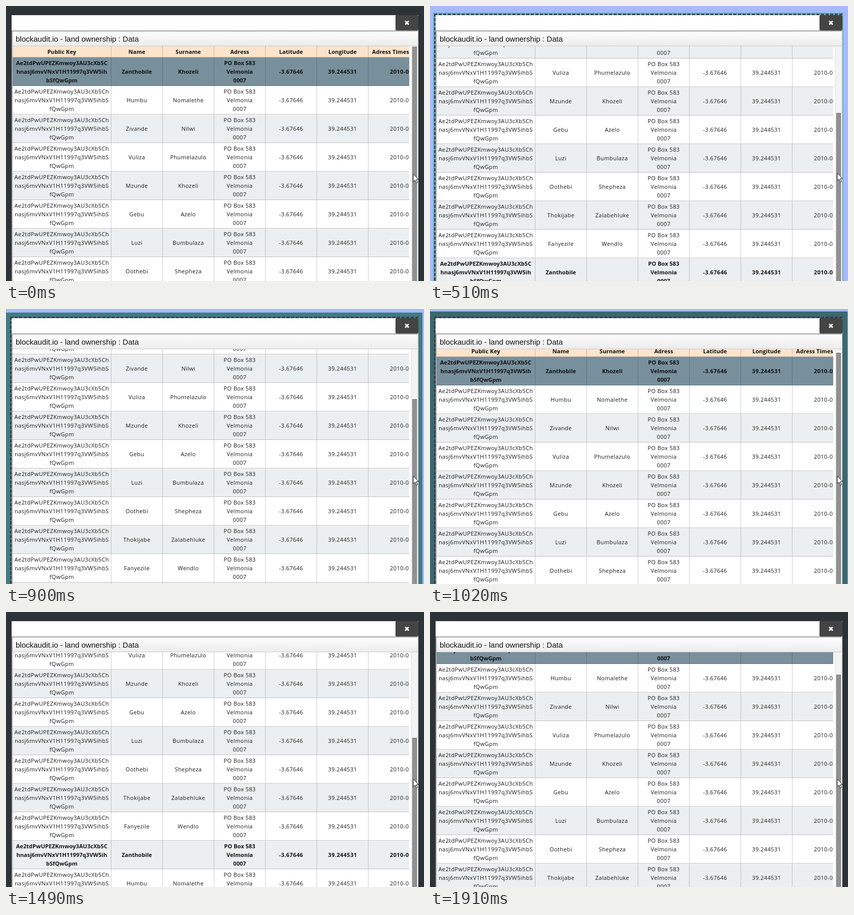
An HTML page that plays this animation: 821x540 px, repeating every 1940 ms.

```html
<!DOCTYPE html>
<html lang="en">
<head>
<meta charset="utf-8">
<title>Land ownership data</title>
<style>
  html, body { margin: 0; width: 100%; height: 100%; overflow: hidden; }
  body { position: relative; background: #a9b9fa; }
  body * { box-sizing: border-box; }
  .abs { position: absolute; }
  #modal { left: 8px; top: 15px; width: 802px; height: 560px; border: 3px dashed #444; border-width: 3px 0 0 3px; }
  #strip { left: 11px; top: 18px; width: 799px; height: 30px; background: #fff; }
  #close { left: 765px; top: 18px; width: 45px; height: 30px; background: #444; border-radius: 2px; }
  #panel { left: 11px; top: 48px; width: 799px; height: 520px; background: #fff;
           border: 2px solid #a4a4a4; border-right-color: #ddd; }
  #title { left: 13px; top: 50px; width: 795px; height: 29px; padding-left: 6px; border-bottom: 1px solid #ccc;
           background: linear-gradient(#fdfdfd, #ececec); color: #111; font: 15px/29px "Liberation Sans", Arial, sans-serif; }
  #view { left: 13px; top: 79px; width: 779px; height: 461px; overflow: hidden; }
  #table { left: 0; top: 0; width: 900px; color: #1a1a1a; text-align: center; white-space: pre;
           font: 11px/17px "Open Sans", sans-serif; letter-spacing: .4px; }
  .row { display: grid; grid-template-columns: 194px repeat(5, 101px) 1fr; height: 56px; background: #fff; }
  .row:nth-child(even) { background: #eceff1; }
  .row div { display: flex; align-items: center; justify-content: center;
             border: solid rgba(0, 0, 0, .2); border-width: 0 1px 1px 0; }
  .row div:last-child { justify-content: flex-start; padding-left: 42px; }
  .bold { font-weight: 700; letter-spacing: .05px; color: #111; }
  .bold:not(.head) div:nth-child(n + 5) { letter-spacing: .4px; }
  #table .head { height: 22px; background: #fce4cc; }
  .head div:last-child { padding-left: 7px; }
  #table .picked { background: #78909c; }
  #track { left: 796px; top: 79px; width: 12px; height: 461px; background: #f3f3f3; border-left: 1px solid #ddd; overflow: hidden; }
  #thumb { left: 1px; top: 1px; width: 9px; height: 480px; background: #929292; border: 1px solid #757575; }
  #cursor { left: 799px; top: 0; }
</style>
</head>
<body>
<div id="modal" class="abs"></div>
<div id="strip" class="abs"></div>
<div id="panel" class="abs"></div>
<svg id="close" class="abs" viewBox="0 0 45 30">
  <path d="M19 11.5l7 7m0-7l-7 7" stroke="#fff" stroke-width="2.8"/>
</svg>
<div id="title" class="abs">blockaudit.io - land ownership : Data</div>
<div id="view" class="abs"><div id="table" class="abs"></div></div>
<div id="track" class="abs"><div id="thumb" class="abs"></div></div>
<svg id="cursor" class="abs" width="13" height="20">
  <path d="M1 1v15l3.4-3.2 2.6 5.7 2.3-1-2.6-5.5h4.6z" fill="#fff" stroke="#222"/>
</svg>
<script>
const LOOP = 1940;
const KEY = 'Ae2tdPwUPEZKmwoy3AU3cXb5Chnasj6mvVNxV1H11997q3VW5ihbSfQwGpm';
const HEADINGS = ['Public Key', 'Name', 'Surname', 'Adress', 'Latitude', 'Longitude', 'Adress Timestamp'];
const PEOPLE = [
  ['Zanthobile', 'Khozeli'], ['Humbu', 'Nomalethe'], ['Zivande', 'Nilwi'],
  ['Vuliza', 'Phumelazulo'], ['Mzunde', 'Khozeli'], ['Gebu', 'Azelo'],
  ['Luzi', 'Bumbulaza'], ['Oothebi', 'Shepheza'], ['Thokijabe', 'Zalabehluke'],
  ['Fanyezile', 'Wendlo']
];
const $ = id => document.getElementById(id);

function addRow(cells, className) {
  const row = document.createElement('div');
  row.className = 'row ' + className;
  for (const text of cells) row.appendChild(document.createElement('div')).textContent = text;
  $('table').append(row);
}

function addPerson(name, surname, className = '') {
  const [a, b] = className ? [25, 51] : [26, 53];
  const key = [KEY.slice(0, a), KEY.slice(a, b), KEY.slice(b)].join('\n');
  addRow([key, name, surname, 'PO Box 583\nVelmonia\n0007', '-3.67646', '39.244531', '2010-01-01'], className);
}

addRow(HEADINGS, 'bold head');
PEOPLE.forEach(([name, surname], i) => addPerson(name, surname, i ? '' : 'bold picked'));
// The list starts over, its first entry without a surname.
PEOPLE.slice(0, 4).forEach(([name, surname], i) => addPerson(name, i ? surname : '', i ? '' : 'bold'));

function smooth(t, start, length) {
  const u = Math.min(1, Math.max(0, (t - start) / length));
  return u * u * (3 - 2 * u);
}

function scrollAt(t) {
  // The list rests at the bottom, then moves on with a short hitch.
  if (t >= 1570 && t < 1740) t = 1570;
  else if (t >= 1740) t = t < 1790 ? 1740 : Math.min(t, 1910);
  return 250 * (smooth(t, 328, 300) - smooth(t, 750, 300) + smooth(t, 1265, 300) - smooth(t, 1715, 280));
}

const mix = (from, to, p) => `rgb(${from.map((v, i) => Math.round(v + (to[i] - v) * p))})`;

function draw(now) {
  const t = now % LOOP;
  const pulse = t < 240 ? 1 : smooth(t, 240, 1330);
  const glow = mix([87, 194, 208], [43, 51, 55], pulse);
  const modal = $('modal').style;
  modal.backgroundColor = glow;
  modal.borderColor = mix([72, 72, 74], [52, 50, 54], pulse);
  modal.boxShadow = `0 0 0 ${16 * pulse}px ${glow}`;

  const scroll = Math.round(scrollAt(t));
  $('table').style.top = -scroll + 'px';
  $('thumb').style.top = 1 + Math.round(scroll * .786) + 'px';
  $('cursor').style.top = (t < 30 ? 329 : 327) + 'px';
  requestAnimationFrame(draw);
}
requestAnimationFrame(draw);
</script>
</body>
</html>
```
